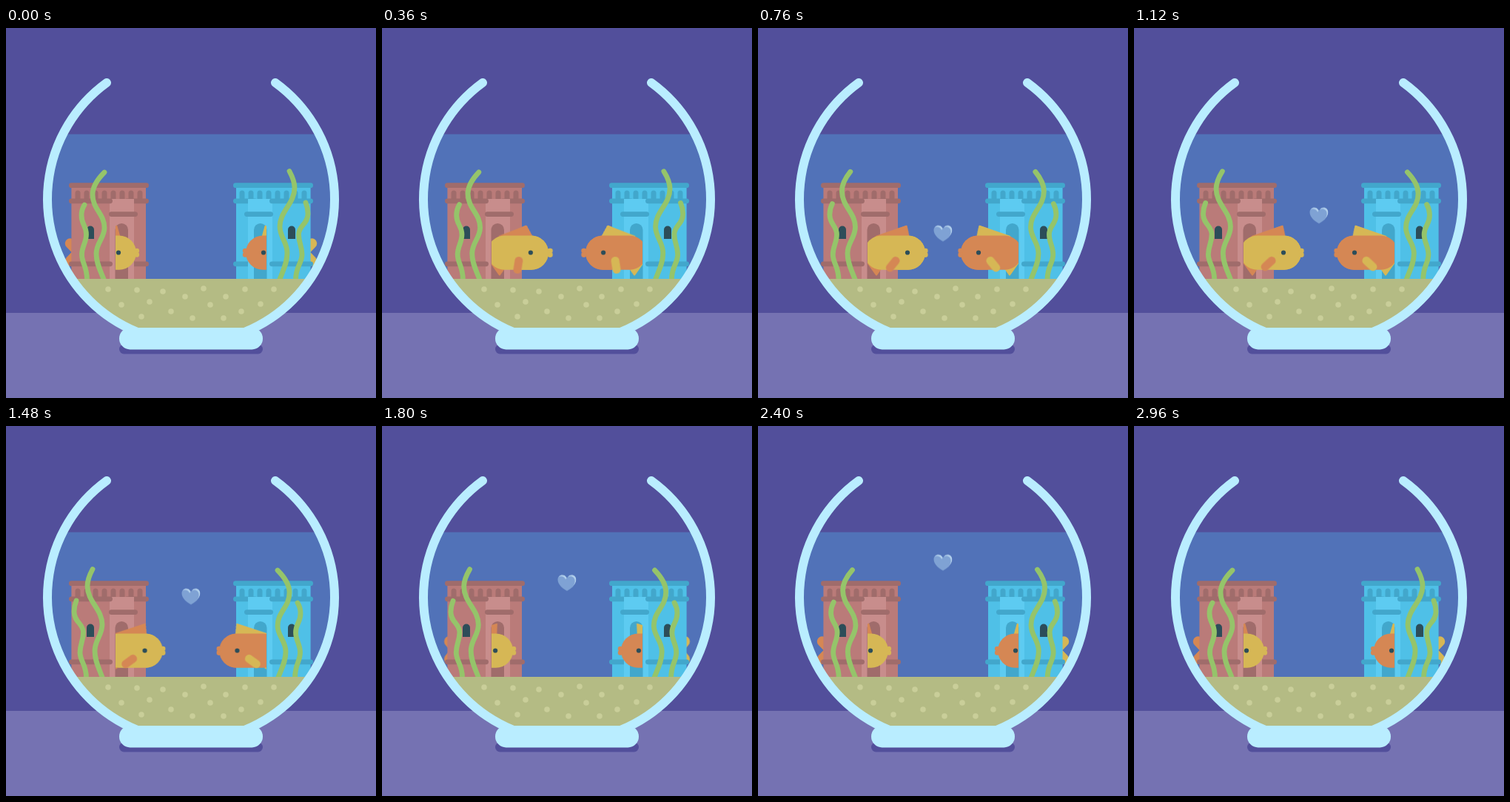
An HTML page for the animation above (3000 ms loop, 500 by 500 pixels).

```html
<!DOCTYPE html>
<html lang="en">
<head>
<meta charset="utf-8">
<title>Fish bowl</title>
<style>
  html, body { margin: 0; width: 100%; height: 100%; overflow: hidden; background: #524f9b; }
  svg { display: block; width: 100vw; height: 100vh; }

  .left  { --wing: #ba7b79; --mid: #c88d8c; --dark: #a06c6b; --body: #d6b755; --fin: #d58754; }
  .right { --wing: #4fc0e7; --mid: #5dcbf1; --dark: #42a7cc; --body: #d58754; --fin: #d6b755; }

  .wing { fill: var(--wing); }
  .mid  { fill: var(--mid); }
  .dark { fill: var(--dark); }
  .ink  { fill: #2c4d59; }
  .body { fill: var(--body); }
  .fin  { fill: var(--fin); }
  .limb { stroke: var(--fin); stroke-linecap: round; }
  .weed { fill: none; stroke: #95c46a; stroke-width: 6.8; stroke-linecap: round; }

  .swim, .dorsal, .belly, .mouth, .paddle, .tail, .weed {
    animation: 3s cubic-bezier(.37, 0, .63, 1) infinite;
  }
  .swim   { animation-name: swim; }
  .dorsal { animation-name: lean; transform-origin: 2px 281px; }
  .belly  { animation-name: fold; transform-origin: -42px 320px; }
  .mouth  { animation-name: kiss; }
  .paddle { animation-name: paddle; transform-origin: -16px 314.5px; }
  .tail   { animation-name: tail; transform-origin: -50px 303px; }
  .tall   { animation-name: tall; }
  .short  { animation-name: short; }
  .right .weed { animation-delay: -1.5s; }
  .rise { animation: rise 3s infinite; }
  .fade { animation: fade 3s linear infinite; }

  @keyframes swim {
    0% { transform: translateX(-50px); }
    13.33%, 41% { transform: none; }
    65.33% { transform: translateX(-55px); }
    77.33%, 100% { transform: translateX(-50px); }
  }
  @keyframes lean {
    0%, 76%, 100% { transform: skewX(0deg); }
    12% { transform: skewX(15deg); }
    25%, 41% { transform: skewX(-4deg); }
    49% { transform: skewX(-11deg); }
    60% { transform: skewX(-18deg); }
  }
  @keyframes fold {
    0%, 49%, 100% { transform: rotate(28deg); }
    12%, 41% { transform: rotate(0deg); }
  }
  @keyframes kiss {
    0%, 60%, 100% { transform: translateX(0); }
    12% { transform: translateX(1.5px); }
    25%, 41% { transform: translateX(-.7px); }
  }
  @keyframes paddle {
    0%, 80%, 100% { transform: rotate(45deg); }
    12% { transform: rotate(9deg); }
    25% { transform: rotate(39deg); }
    49% { transform: rotate(54deg); }
  }
  @keyframes tail {
    0%, 41%, 67%, 100% { transform: scaleX(1); }
    60% { transform: scaleX(.86); }
  }
  @keyframes tall {
    0%, 100% { d: path("M133 195 C122 206 117 216 117 225 C117 245 133 251 133 270 C133 284 122 290 122 305 C122 319 128 328 133 342"); }
    50% { d: path("M117 193.5 C113 201 110 208 110 216 C110 237 130 248 130 268 C130 283 120 289 120 304 C120 318 126 328 131 342"); }
  }
  @keyframes short {
    0%, 100% { d: path("M106 239 C103 244 102 248 102 253 C102 266 108.5 267 108.5 279 C108.5 290 102.5 295 102.5 306 C102.5 318 109.5 322 109.5 340"); }
    50% { d: path("M95 236 C93 241 92 245 92 251 C92 265 104.5 267 104.5 279 C104.5 290 100 295 100 306 C100 318 108.5 322 108.5 340"); }
  }
  @keyframes rise {
    0%, 18.67% { transform: translate(250px, 291px); animation-timing-function: cubic-bezier(.333, .429, .667, .884); }
    93.33%, 100% { transform: translate(250px, 173.6px); }
  }
  @keyframes fade {
    0%, 18.67%, 93.33%, 100% { opacity: 0; }
    24%, 86% { opacity: 1; }
  }
</style>
</head>
<body>
<svg id="stage" viewBox="0 0 500 500"></svg>
<script>
  const bar = (x, y, w) => `<rect class="dark" x="${x}" y="${y}" width="${w}" height="6.8" rx="3.4"/>`;
  const box = (cls, x, y, w, h) => `<rect class="${cls}" x="${x}" y="${y}" width="${w}" height="${h}"/>`;
  const arch = (cls, x, y, w, h) =>
    `<path class="${cls}" d="M${x} ${y + h}V${y + w / 2}a${w / 2} ${w / 2} 0 0 1 ${w} 0V${y + h}z"/>`;

  // Fish space: x = 0 at the eye when fully out.
  const fish = `<g transform="translate(202 0)"><g class="swim">
    <path class="tail limb" fill="none" stroke-width="13.5" stroke-linejoin="round" d="M-65.5 291L-54 303L-65.5 315"/>
    <path class="dorsal fin" d="M-44 284L-43 281L-3 266.9Q-2 266.5 -1.6 267.5L3 284z"/>
    <path class="belly fin" d="M-60 310L-43 334Q-42 335 -41 334L-34 324z"/>
    <rect class="body" x="-58.5" y="280.6" width="82.5" height="46.2" rx="23.1"/>
    <g class="mouth body"><circle cx="24.8" cy="301" r="3.3"/><circle cx="24.8" cy="306.4" r="3.3"/></g>
    <circle class="ink" cx="0" cy="303.5" r="3.1"/>
    <path class="paddle limb" stroke-width="11" d="M-16 314.5V326.5"/>
  </g></g>`;

  const castle = [
    box('wing', 88.4, 213, 100.6, 130),
    ...Array.from({ length: 8 }, (_, i) => arch('dark', 93.5 + 12 * i, 219.5, 7, 12)),
    bar(85, 209.3, 108),
    bar(160, 230.4, 33), bar(160, 315.4, 33),
    box('mid', 140, 231, 33, 112),
    bar(85, 230.4, 59), bar(85, 315.4, 59),
    bar(139, 248.2, 39),
    arch('dark', 147.5, 264, 17.5, 79),
    arch('ink', 109, 267.5, 10, 17.5)
  ].join('');

  const half = (side, flip) => `<g class="${side}" transform="${flip}">
    ${fish}${castle}
    <g clip-path="url(#door)">${fish}</g>
    <path class="weed short"/><path class="weed tall"/>
  </g>`;

  const dots = [
    [138, 353], [177, 354], [212, 356], [267, 352], [323, 353], [362, 353],
    [156, 374], [194, 370], [242, 363], [276, 374], [297, 363], [344, 373],
    [183, 390], [223, 383], [252, 392], [294, 392], [318, 383]
  ].map(([x, y]) => `<circle cx="${x}" cy="${y}" r="3.8"/>`).join('');

  const heart = 'M0 11C-4 9 -12.5 3 -12.5 -4C-12.5 -12 -3 -13 0 -6.5C3 -13 12.5 -12 12.5 -4C12.5 3 4 9 0 11z';
  const pill = (y, h, color) => `<rect x="153" y="${y}" width="194" height="${h}" rx="${h / 2}" fill="${color}"/>`;

  document.getElementById('stage').innerHTML = `
    <defs>
      <clipPath id="bowl"><circle cx="250" cy="231" r="194"/></clipPath>
      <clipPath id="door"><rect x="148" y="240" width="110" height="110"/></clipPath>
      <clipPath id="heart"><path d="${heart}"/></clipPath>
    </defs>
    <rect width="500" height="500" fill="#524f9b"/>
    <rect y="385" width="500" height="115" fill="#7572b2"/>
    <g clip-path="url(#bowl)">
      <rect x="50" y="143.5" width="400" height="290" fill="#5172b8"/>
      ${half('left', '')}
      ${half('right', 'translate(500 0) scale(-1 1)')}
      <rect x="50" y="339" width="400" height="90" fill="#b4bb84"/>
      <g fill="#c9ce99">${dots}</g>
      <g class="rise"><g class="fade" clip-path="url(#heart)">
        <path d="${heart}" fill="#b2d0ec"/>
        <path d="${heart}" fill="#7fa2d4" transform="translate(-1.8 2)"/>
      </g></g>
    </g>
    ${pill(427.5, 13, '#524f9b')}
    <path d="M136 74A194 194 0 1 0 364 74" fill="none" stroke="#b9edff" stroke-width="12" stroke-linecap="round"/>
    ${pill(405, 29.4, '#b9edff')}`;
</script>
</body>
</html>
```
